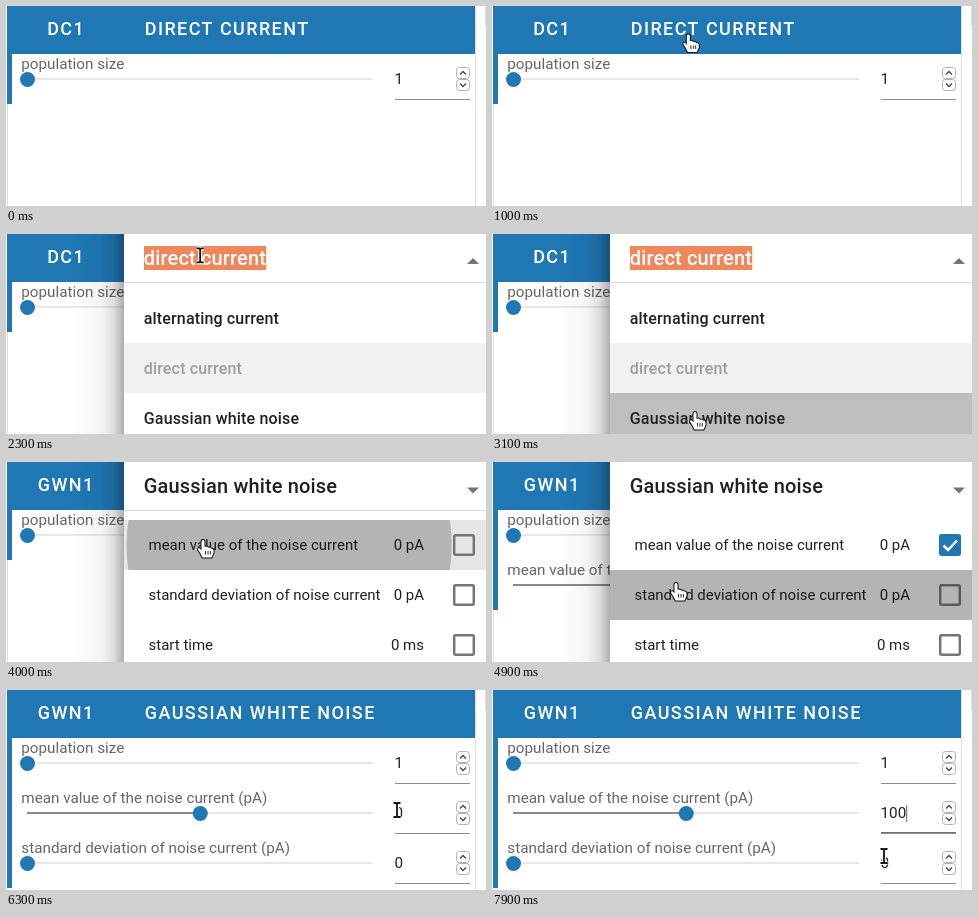
Animation of 480 by 200 pixels, one loop 8000 ms. Source, as an HTML page with a canvas:

```html
<!DOCTYPE html>
<html lang="en">
<head>
<meta charset="utf-8">
<title>Stimulus settings</title>
<style>
  html, body { margin: 0; width: 100%; height: 100%; overflow: hidden; background: #fff; }
  canvas { display: block; width: 480px; height: 200px; }
</style>
</head>
<body>
<canvas id="stage"></canvas>
<script>
const LOOP = 8000;
const BLUE = '#1f77b4', INK = '#212121', GREY = '#757575', ORANGE = '#f0875a';
const PANEL_X = 118;

const canvas = document.getElementById('stage');
const ctx = canvas.getContext('2d');
const dpr = window.devicePixelRatio || 1;
canvas.width = 480 * dpr;
canvas.height = 200 * dpr;

// Pointer keys: time, x, y
const POINTER = [
  [690, 240, 206], [1050, 194, 19], [2250, 194, 19], [2950, 203, 178], [3250, 203, 178],
  [3850, 197, 78], [4050, 197, 78], [4450, 184, 121], [5050, 184, 121], [5300, 54, 196],
  [5450, 54, 196], [5500, 50, 215], [6100, 120, 215], [6200, 168, 168], [6300, 391, 120],
  [6650, 391, 120], [7050, 340, 112], [7450, 340, 112], [7850, 392, 166], [8000, 392, 166]
];

const HAND = new Path2D('M-1.5 1.5a1.5 1.5 0 0 1 3 0V7l1-.6 2.2.6.6.8 1.8-.2.8 1 1.8.2.8 1.4V13l-2 4.5H-.5l-2-4L-5 9.6c0-1.5 1.6-1.6 2.4-.6L-1.5 10.5z');
const ARROW = new Path2D('M0 0V15l3.5-3.2 2.3 5.2 2.4-1-2.3-5.1H11z');
const BEAM = new Path2D('M-3.5-7H-1L0-6 1-7H3.5M0-6V6M-3.5 7H-1L0 6 1 7H3.5');

const clamp = v => Math.min(1, Math.max(0, v));
const progress = (t, start, length) => clamp((t - start) / length);
const easeOut = p => 1 - (1 - p) ** 3;
const smooth = p => p * p * (3 - 2 * p);
const mix = (a, b, p) => a + (b - a) * p;

function rect(x, y, w, h, color) {
  ctx.fillStyle = color;
  ctx.fillRect(x, y, w, h);
}

function text(str, x, y, { size = 15, weight = 400, color = INK, spacing = 0, align = 'left' } = {}) {
  ctx.font = `${weight} ${size}px Roboto, sans-serif`;
  ctx.letterSpacing = spacing + 'px';
  ctx.textAlign = align;
  ctx.fillStyle = color;
  ctx.fillText(str, x, y);
  return ctx.measureText(str).width;
}

function line(points, color, width) {
  ctx.beginPath();
  points.forEach(([x, y]) => ctx.lineTo(x, y));
  ctx.strokeStyle = color;
  ctx.lineWidth = width;
  ctx.stroke();
}

function disc(x, y, r, color) {
  ctx.beginPath();
  ctx.arc(x, y, r, 0, 2 * Math.PI);
  ctx.fillStyle = color;
  ctx.fill();
}

function roundBox(x, y, w, h, r) {
  ctx.beginPath();
  ctx.roundRect(x, y, w, h, r);
}

function withAlpha(alpha, draw) {
  if (alpha <= 0) return;
  ctx.save();
  ctx.globalAlpha *= alpha;
  draw();
  ctx.restore();
}

function pointerAt(t) {
  const i = POINTER.findIndex(key => key[0] > t);
  if (i < 1) return { x: 240, y: 300 };
  const [t0, x0, y0] = POINTER[i - 1], [t1, x1, y1] = POINTER[i];
  const p = smooth((t - t0) / (t1 - t0));
  return { x: mix(x0, x1, p), y: mix(y0, y1, p) };
}

function spinButton(y, direction) {
  roundBox(450.5, y, 13, 11, 3);
  ctx.strokeStyle = '#b0b0b0';
  ctx.lineWidth = 1;
  ctx.stroke();
  const mid = y + 5.5;
  line([[454, mid + 1.5 * direction], [457, mid - 1.5 * direction], [460, mid + 1.5 * direction]], '#444', 1.3);
}

function sliderRow(top, label, value, position, focused) {
  text(label, 15.3, top + 15, { size: 15.25, color: '#666' });
  const thumb = mix(21.5, 367, position);
  rect(21, top + 24, 346, 2, '#e8e8e8');
  rect(21, top + 24, thumb - 21, 2, '#8a8a8a');
  disc(thumb, top + 25.5, 7.5, BLUE);
  text(value, 388.5, top + 30, { size: 15.25 });
  if (focused) rect(389, top + 94, 75, 2, '#707070');
  rect(389, top + 45, 75, 1, '#8c8c8c');
  spinButton(top + 13.5, 1);
  spinButton(top + 25.5, -1);
}

function drawCard(t) {
  const noise = t >= 3200;
  const rows = t >= 5100 ? 3 : t >= 4100 ? 2 : 1;
  rect(1, 0, 1, 200, '#ddd');
  rect(469, 0, 1, 200, '#ddd');
  rect(479, 0, 1, 20, '#ddd');
  rect(1, 0, 468, 48, BLUE);
  rect(1, 48, 5, rows * 50, BLUE);
  const caps = { size: 18, weight: 500, color: '#fff', spacing: 1.43 };
  text(noise ? 'GWN1' : 'DC1', 60.2, 29, { ...caps, align: 'center' });
  text(noise ? 'GAUSSIAN WHITE NOISE' : 'DIRECT CURRENT', 138.7, 29, caps);

  const typed = '100'.slice(0, Math.floor((t - 7000) / 100)) || '0';
  const focused = t >= 6500;
  sliderRow(48, 'population size', '1', 0, focused);
  if (rows > 1) sliderRow(98, 'mean value of the noise current (pA)', typed, 0.5);
  if (rows > 2) sliderRow(148, 'standard deviation of noise current (pA)', '0', 0);
  if (t >= 6600 && t < 7100) {
    rect(388.5, 114, 8.5, 18, ORANGE);
    text('0', 388.5, 128, { size: 15.25, color: '#fff' });
  } else if (focused && (t - 7400) % 1000 < 600) {
    rect(388.5 + typed.length * 8.56, 115, 1, 17, '#666');
  }
}

// Circle that grows from the click point towards the middle of its row
function ripple(t, top, x, start, release) {
  const k = easeOut(progress(t, start, 200));
  withAlpha(0.22 * (1 - progress(t, release, 250)), () => {
    if (!k) return;
    ctx.beginPath();
    ctx.rect(PANEL_X, top, 362, 50);
    ctx.clip();
    disc(mix(x, 299, k), top + 25, 193 * k, '#000');
  });
}

function checkbox(y, checked) {
  roundBox(448.2, y - 9.8, 19.6, 19.6, 1.5);
  ctx.lineWidth = 2.5;
  ctx.strokeStyle = checked ? BLUE : GREY;
  ctx.stroke();
  if (!checked) return;
  ctx.fillStyle = BLUE;
  ctx.fill();
  line([[451.5, y + 0.5], [456, y + 5], [465, y - 4.5]], '#fff', 2.5);
}

function drawParams(t, pointer) {
  const rows = t < 3200
    ? [['amplitude of current', '0 pA'], ['start time', '0 ms'], ['stop time', '1000 ms']]
    : [['mean value of the noise current', '0 pA'], ['standard deviation of noise current', '0 pA'], ['start time', '0 ms']];
  const checkedAt = [4100, 5100, Infinity];
  rows.forEach(([name, value], i) => {
    const top = 58 + 50 * i;
    const hover = t > 3200 && pointer.x > PANEL_X && pointer.y >= top && pointer.y < top + 50;
    if (hover) rect(PANEL_X, top, 362, 50, '#e6e6e6');
    text(name, 142.5, top + 30);
    text(value, 418, top + 30, { align: 'right' });
    checkbox(top + 25, t >= checkedAt[i]);
  });
  ripple(t, 58, 198, 3909, 4100);
  ripple(t, 108, 184, 4720, 5050);
}

function drawMenu(t, pointer) {
  const items = ['alternating current', 'direct current', 'Gaussian white noise'];
  rect(PANEL_X, 49, 362, 151, '#fff');
  items.forEach((name, i) => {
    const top = 59 + 50 * i, disabled = i === 1;
    const hover = pointer.y >= top && pointer.y < top + 50;
    if (disabled) rect(PANEL_X, top, 362, 50, '#f1f1f1');
    else if (hover) rect(PANEL_X, top, 362, 50, '#f3f3f3');
    if (i === 2) ripple(t, top, 203, 2910, 3200);
    text(name, 137.8, top + 31, { size: 16, weight: 500, spacing: 0.15, color: disabled ? '#9e9e9e' : INK });
  });
}

function drawPanel(t, pointer) {
  const shade = ctx.createLinearGradient(65, 0, PANEL_X, 0);
  [[0, 0], [0.55, 0.04], [0.8, 0.13], [1, 0.32]].forEach(([at, a]) => shade.addColorStop(at, `rgba(0,0,0,${a})`));
  rect(65, 0, PANEL_X - 65, 200, shade);
  rect(PANEL_X, 0, 362, 200, '#fff');
  drawParams(t, pointer);

  const menuAlpha = easeOut(progress(t, 1700, 300)) * (1 - progress(t, 3150, 250));
  withAlpha(menuAlpha, () => drawMenu(t, pointer));

  const title = t < 3200 ? 'direct current' : 'Gaussian white noise';
  const style = { size: 20, weight: 500, spacing: 0.15 };
  const width = text(title, 137.8, 31, style);
  if (t >= 1600 && t < 3200) {
    rect(138, 12, width, 24, ORANGE);
    text(title, 137.8, 31, { ...style, color: '#fff' });
  }
  if (t >= 1600 && t < 4100) rect(PANEL_X, 48, 362, 1, '#d8d8d8');

  const open = t >= 1800 && t < 3200;
  const [base, tip] = open ? [30, 24] : [25.5, 31.5];
  ctx.beginPath();
  ctx.moveTo(461, base);
  ctx.lineTo(473, base);
  ctx.lineTo(467, tip);
  ctx.fillStyle = GREY;
  ctx.fill();
}

function drawPointer({ x, y }, panelOpen, t) {
  const overPanel = panelOpen && x > PANEL_X;
  const beam = overPanel ? y < 48 : t > 6000 && x > 384;
  const hand = overPanel || y < 48;
  ctx.save();
  ctx.translate(x, y);
  ctx.lineJoin = 'round';
  const stroke = (path, color, width) => {
    ctx.strokeStyle = color;
    ctx.lineWidth = width;
    ctx.stroke(path);
  };
  if (beam) {
    stroke(BEAM, '#fff', 4);
    stroke(BEAM, '#111', 1.8);
  } else {
    const path = hand ? HAND : ARROW;
    stroke(path, hand ? '#111' : '#fff', 2);
    ctx.fillStyle = hand ? '#fff' : '#111';
    ctx.fill(path);
    if (hand) [2.5, 5, 7.3].forEach(fx => line([[fx, 11], [fx, 14.5]], '#111', 0.9));
  }
  ctx.restore();
}

function draw(t) {
  const pointer = pointerAt(t);
  const panelAlpha = easeOut(progress(t, 1110, 300)) * (1 - progress(t, 5720, 270));
  ctx.setTransform(dpr, 0, 0, dpr, 0, 0);
  rect(0, 0, 480, 200, '#fff');
  drawCard(t);
  withAlpha(panelAlpha, () => drawPanel(t, pointer));
  drawPointer(pointer, panelAlpha > 0, t);
}

const begin = performance.now();
function tick() {
  draw((performance.now() - begin) % LOOP);
  requestAnimationFrame(tick);
}
tick();
</script>
</body>
</html>
```
